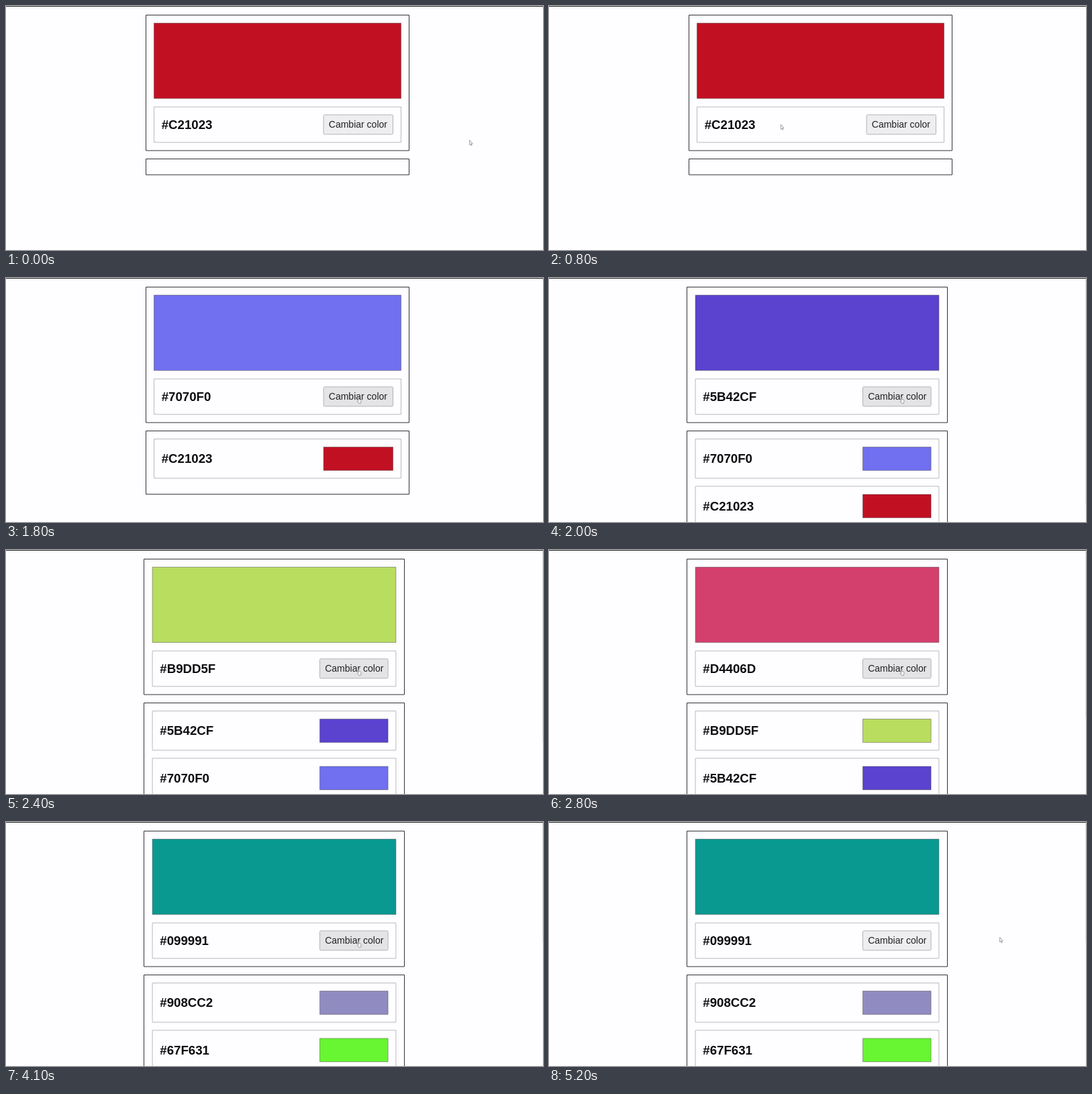
Recreate the animation shown at these times as an HTML page with a canvas. Size 800 px wide and 363 px high, loop 5.3 s.

```html
<!DOCTYPE html>
<html lang="es">
<head>
<meta charset="utf-8">
<title>Cambiar color</title>
<style>
  html, body { margin: 0; height: 100%; overflow: hidden; background: #fefdff; }
  canvas { display: block; width: 800px; height: 363px; }
</style>
</head>
<body>
<canvas id="stage" width="800" height="363"></canvas>
<script>
const ctx = document.getElementById('stage').getContext('2d');
const LOOP = 5300, STEP = 100;
const FONT = '"Liberation Sans", Arial, sans-serif';
const DARK = '#333236', LIGHT = '#bab9bc', EDGE = 'rgba(50, 50, 50, .42)';

const START = '#C21023';
// Each color appears when the button is released; it is held down one step earlier.
const clicks = [
  [1600, '#7070F0'], [2000, '#5B42CF'], [2400, '#B9DD5F'], [2800, '#D4406D'],
  [3300, '#67F631'], [3700, '#908CC2'], [4100, '#099991']
];

// Pointer path: time, x, y
const path = [
  [0, 690, 199], [300, 590, 183], [600, 474, 173], [900, 280, 177],
  [1200, 509, 179], [1400, 523, 177], [4400, 523, 177], [4700, 632, 155],
  [4800, 641, 154], [4900, 641, 154], [5200, 671, 171]
];

function pointerAt(t) {
  const i = Math.max(1, path.findIndex(p => p[0] >= t));
  const [t0, x0, y0] = path[i - 1], [t1, x1, y1] = path[i] || path[i - 1];
  const k = t1 > t0 ? (t - t0) / (t1 - t0) : 1;
  return [x0 + (x1 - x0) * k, y0 + (y1 - y0) * k];
}

function box(x, y, right, bottom, stroke, fill, radius = 0) {
  ctx.beginPath();
  ctx.roundRect(x + .5, y + .5, right - x, bottom - y, radius);
  if (fill) { ctx.fillStyle = fill; ctx.fill(); }
  ctx.strokeStyle = stroke;
  ctx.lineWidth = 1;
  ctx.stroke();
}

function label(text, x, y, font, color) {
  ctx.font = `${font} ${FONT}`;
  ctx.fillStyle = color;
  ctx.fillText(text, x, y);
}

const hexLabel = (hex, x, y) => label(hex, x, y, 'bold 18.67px', '#0c0c0e');

function drawPointer(x, y, hand) {
  ctx.save();
  ctx.translate(x, y);
  ctx.fillStyle = '#fcfcfd';
  ctx.strokeStyle = '#77767b';
  ctx.lineWidth = .7;
  ctx.stroke(ctx.fill(hand) || hand);
  ctx.restore();
}
const arrow = new Path2D('M.6 .6V7.6L2.1 6.3L3.2 8.7L4.2 8.2L3.2 5.9H5.2Z');
const hand = new Path2D('M1.7 1Q2.4 .2 2.9 1V3.6L5.5 4.2Q6.3 4.5 6.1 6L5.4 9.4H2.4L.4 6.3Q.5 5.3 1.7 6Z');

function draw(t) {
  const done = clicks.filter(c => c[0] <= t).map(c => c[1]);
  const colors = [START, ...done].reverse();
  const [current, ...history] = colors;
  const scrolls = history.length > 1;
  const pressed = clicks.some(c => t >= c[0] - STEP && t < c[0]);

  // The scrollbar narrows the page and shifts every column.
  const [left, innerLeft, textX, buttonX, buttonRight, innerRight, right] = scrolls
    ? [205, 217.6, 229.3, 467, 568.6, 580.4, 593]
    : [208, 220, 231.7, 472.6, 576, 588, 600];

  const [px, py] = pointerAt(t);
  const hover = px + 2 > buttonX && px + 2 < buttonRight && py > 161 && py < 191;

  ctx.fillStyle = '#fefdff';
  ctx.fillRect(0, 0, 800, 363);
  ctx.fillStyle = '#28272b';
  ctx.fillRect(0, 0, 800, 1);

  box(left, 13, right, 214.6, DARK);
  box(innerLeft, 25, innerRight, 137, EDGE, current);
  box(innerLeft, 149.6, innerRight, 202.4, LIGHT);
  hexLabel(current, textX, 182.6);
  box(buttonX, 161.4, buttonRight, 190.4, '#b4b3b6',
      pressed ? '#f4f4f5' : hover ? '#e4e3e5' : '#eeedef', 1.5);
  label('Cambiar color', buttonX + 8.2, 181, '14px', '#222124');

  const pitch = 70.4;
  box(left, 227, right, 250.6 + (history.length ? pitch * history.length - 11.5 + 11.7 : 0), DARK);
  history.slice(0, 2).forEach((hex, i) => {
    const y = 239 + i * pitch;
    box(innerLeft, y, innerRight, y + 58.4, LIGHT);
    hexLabel(hex, textX, y + 36.4);
    box(buttonX, y + 12, buttonRight, y + 46.8, EDGE, hex);
  });

  if (scrolls) {
    ctx.fillStyle = '#f3f2f4';
    ctx.fillRect(799, 1, 1, 362);
    ctx.fillStyle = '#e0dfe2';
    ctx.fillRect(799, 1, 1, 363 * 363 / (251 + pitch * history.length));
  }

  drawPointer(px, py, hover ? hand : arrow);
}

function frame() {
  draw(Math.floor(performance.now() % LOOP / STEP) * STEP);
  requestAnimationFrame(frame);
}
frame();
</script>
</body>
</html>
```
